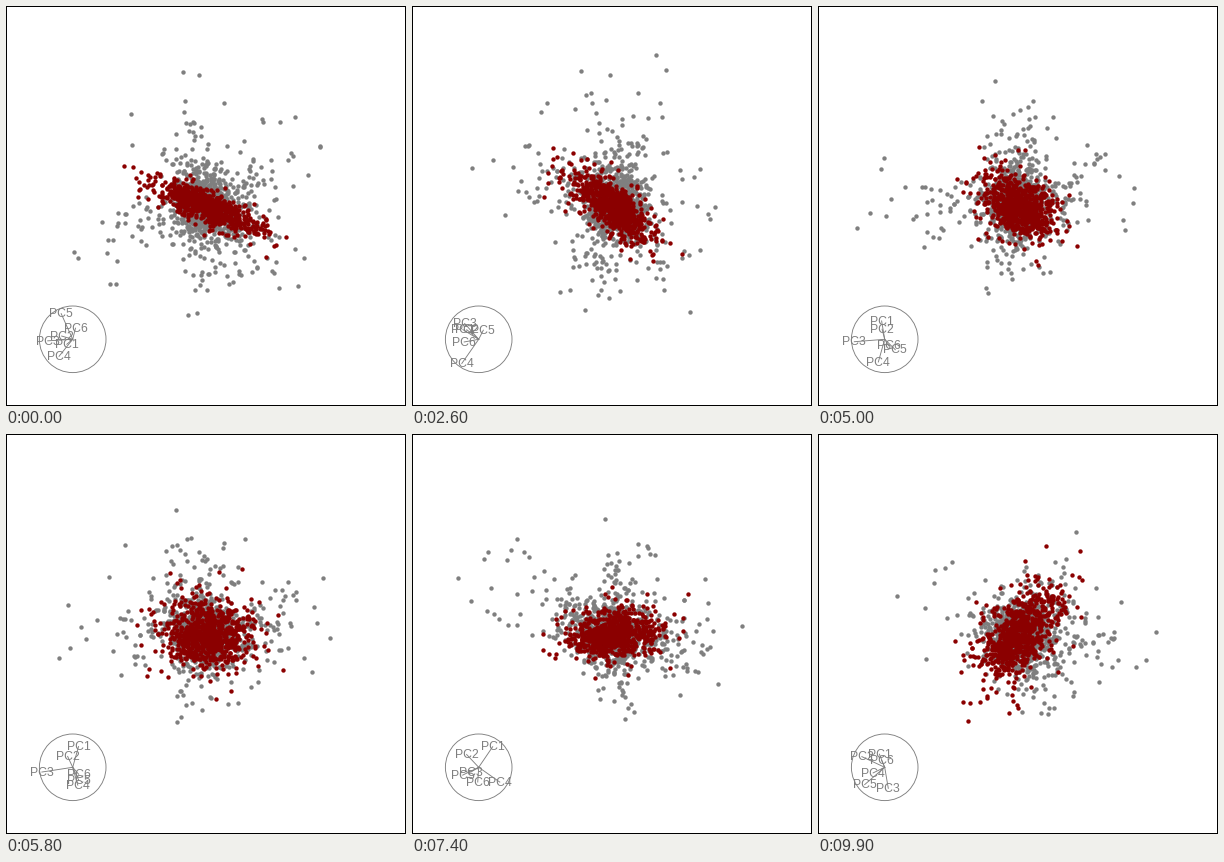
Write a matplotlib script that moves like this. It is 400 px wide and 400 px high and loops after 10 s.

```python
import numpy as np
import matplotlib.pyplot as plt
from matplotlib.animation import FuncAnimation
from matplotlib.patches import Circle, Rectangle

SIZE, FRAMES, STEP = 400, 100, 100
PX = 0.72  # points per pixel at 100 dpi
GREY, RED = "#7f7f7f", "#8b0000"
HUB, RADIUS = np.array([66.7, 333.3]), 33.3
rng = np.random.default_rng(6)

# Tour stops: seconds, axis tips PC1..PC6 in pixels from the hub,
# and the red ellipse seen there (degrees, long and short deviation).
STOPS = [
    (0.0, [(-6, 5), (-11, -3), (-25, 2), (-14, 17), (-11, -25), (3, -11)], (23, 29, 6)),
    (2.6, [(-16, -9), (-12, -9), (-14, -15), (-18, 24), (5, -9), (-15, 3)], (37, 23, 8)),
    (4.1, [(-14, -15), (0, -9), (-22, -3), (-16, 27), (14, 8), (1, 6)], (53, 20, 5)),
    (5.8, [(6, -21), (-5, -11), (-31, 5), (5, 18), (6, 13), (6, 7)], (0, 22, 16)),
    (7.4, [(14, -21), (-12, -13), (-8, 5), (21, 15), (-16, 8), (-1, 15)], (-5, 23, 11)),
    (8.5, [(8, -18), (-13, -9), (13, 11), (8, 17), (-25, 12), (1, 15)], (-37, 21, 6)),
    (9.9, [(-5, -13), (-23, -10), (3, 21), (-12, 6), (-21, 18), (-3, -7)], (-55, 27, 14)),
]

# Grey arms: where each one points at a few stops, in pixels from the centre.
ARMS = [
    {0: (-5, 112), 1: (-35, 108), 2: (-30, 63)},
    {0: (-10, -110), 1: (40, -125), 2: (30, -70)},
    {1: (75, -50), 2: (85, -25), 4: (80, -4)},
    {3: (-63, -85), 5: (-85, -45), 6: (-70, -55)},
    {3: (8, -92), 4: (15, -110), 5: (45, -110)},
    {4: (5, 75), 5: (15, 55), 6: (40, 75)},
    {1: (-127, -45), 2: (-122, -28), 3: (-128, -5)},
    {3: (70, 0), 5: (100, -10), 6: (120, 20)},
]


def orthonormal(m):
    u, _, vt = np.linalg.svd(m, full_matrices=False)
    return u @ vt


TIMES = [s[0] for s in STOPS]
BASES = [orthonormal(np.array(s[1], float)) for s in STOPS]


def basis_at(t):
    k = min(np.searchsorted(TIMES, t, side="right") - 1, len(TIMES) - 2)
    f = (t - TIMES[k]) / (TIMES[k + 1] - TIMES[k])
    return orthonormal((1 - f) * BASES[k] + f * BASES[k + 1])


def ellipse(angle, long, short):
    c, s = np.cos(np.radians(angle)), np.sin(np.radians(angle))
    axes = np.array([[c, -s], [s, c]]) * [long, short]
    return axes @ axes.T


def spread_root(steps=500):
    """Root of the 6-D covariance that projects to the red ellipses."""
    shapes = [ellipse(*s[2]) for s in STOPS]
    cov = np.eye(6) * 150
    for _ in range(steps):
        grad = sum(b @ (b.T @ cov @ b - e) @ b.T for b, e in zip(BASES, shapes))
        w, v = np.linalg.eigh(cov - 0.15 * grad)
        w = np.maximum(w, 0)
        cov = (v * w) @ v.T
    return v * np.sqrt(w)


def locate(track, ridge=0.08):
    """6-D point passing near the given offsets."""
    m = np.vstack([BASES[k].T for k in track])
    y = np.concatenate([np.array(p, float) for p in track.values()])
    return np.linalg.solve(m.T @ m + ridge * np.eye(6), m.T @ y)


def arm(track, n=160, reach=1.25):
    """Points thinning out along a ray that widens towards its tip."""
    tip = reach * locate(track)
    u = rng.beta(0.5, 2.3, (n, 1))
    width = 9 + 0.1 * np.linalg.norm(tip) * u
    return u * tip + width * rng.normal(size=(n, 6))


def blob(n=780, dof=12):
    tail = np.sqrt(dof / rng.chisquare(dof, (n, 1)))
    return 0.94 * tail * rng.normal(size=(n, 6)) @ spread_root().T


LAYERS = [(np.vstack([arm(a) for a in ARMS]), GREY), (blob(), RED)]

fig = plt.figure(figsize=(SIZE / 100, SIZE / 100), dpi=100, facecolor="black")
ax = fig.add_axes([0, 0, 1, 1])
ax.set(xlim=(0, SIZE), ylim=(SIZE, 0))
ax.axis("off")
ax.add_patch(Rectangle((1, 1), SIZE - 2, SIZE - 2, fc="white", lw=0, zorder=0))
ax.add_patch(Circle(HUB, RADIUS, fill=False, ec=GREY, lw=0.9 * PX))

dots = [ax.plot([], [], "o", ms=4.4 * PX, mew=0, color=c)[0] for _, c in LAYERS]
spokes = [ax.plot([], [], color=GREY, lw=0.9 * PX)[0] for _ in range(6)]
labels = [ax.text(0, 0, f"PC{i + 1}", color=GREY, fontsize=12.2 * PX,
                  family="Liberation Sans", ha="center", va="baseline")
          for i in range(6)]


def draw(i):
    basis = basis_at(i * STEP / 1000)
    for (pts, _), dot in zip(LAYERS, dots):
        dot.set_data(*(SIZE / 2 + pts @ basis).T)
    for tip, spoke, label in zip(HUB + RADIUS * basis, spokes, labels):
        spoke.set_data([HUB[0], tip[0]], [HUB[1], tip[1]])
        label.set_position((tip[0], tip[1] + 3.7))
    return dots + spokes + labels


anim = FuncAnimation(fig, draw, frames=FRAMES, interval=STEP,
                     repeat=True, repeat_delay=0)
plt.show()
```
